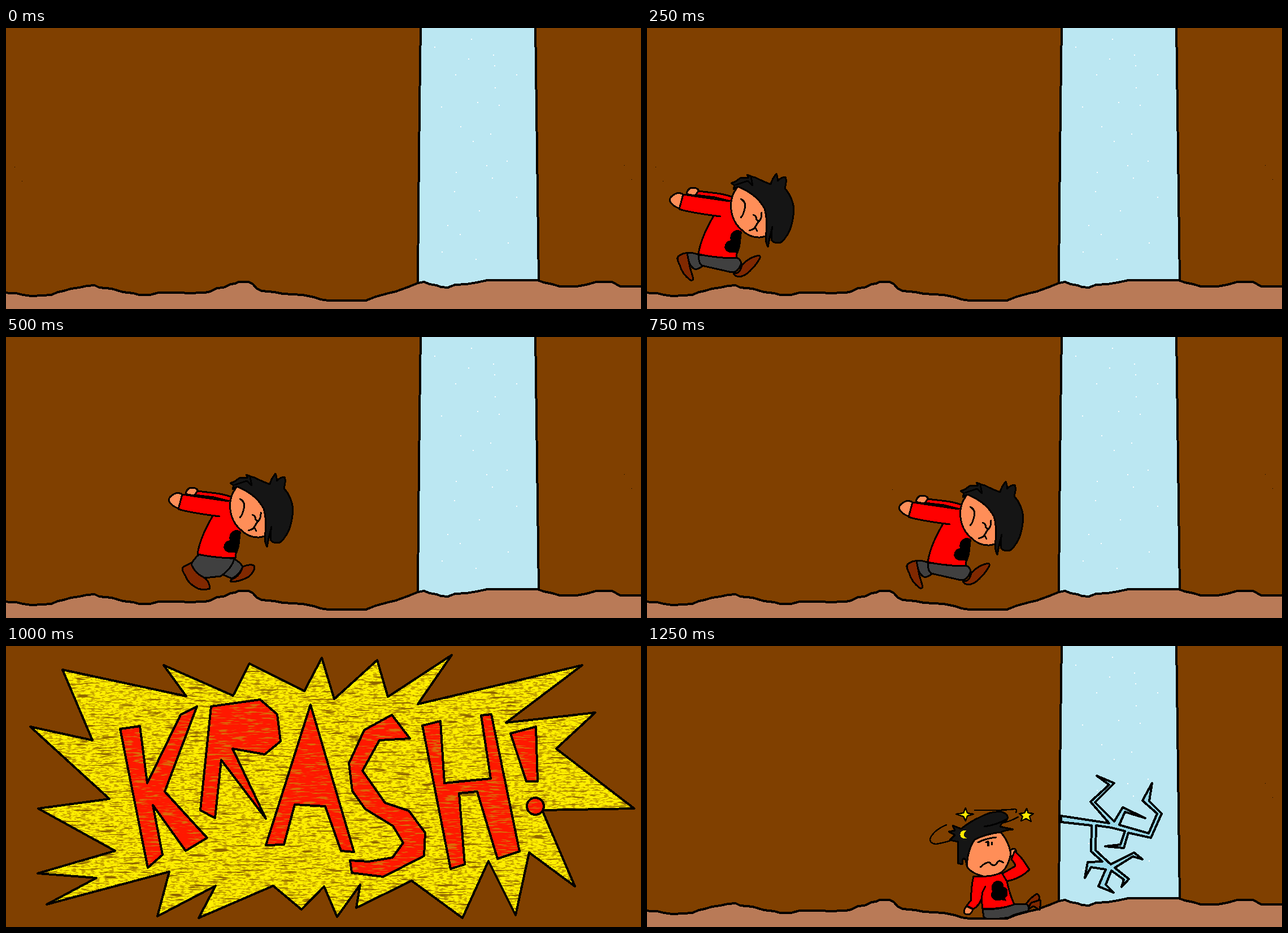
An HTML page for the animation above (1500 ms loop, 1124x498 px).

```html
<!DOCTYPE html>
<html lang="en">
<head>
<meta charset="utf-8">
<title>Krash</title>
<style>
  html, body { margin: 0; width: 100%; height: 100%; overflow: hidden; background: #804000; }
  svg { display: block; width: 100%; height: 100%; }
  .off { display: none; }
  .skin { fill: #ff8e58; }
  .red { fill: #f00; }
  .hair { fill: #151515; }
  .gray { fill: #404040; }
  .shoe { fill: #802800; }
  .gold { fill: #ffe800; }
  .line { fill: none; }
  .flat { stroke: none; }
  .ink { fill: #000; stroke: none; }
</style>
</head>
<body>
<svg viewBox="0 0 1124 498" shape-rendering="crispEdges" stroke="#000" stroke-width="3"
     stroke-linecap="round" stroke-linejoin="round">
  <defs>
    <!-- Grain plus long horizontal streaks, kept inside the painted shape -->
    <filter id="yellowTexture" filterUnits="userSpaceOnUse" x="0" y="0" width="1124" height="498" color-interpolation-filters="sRGB">
      <feTurbulence type="fractalNoise" baseFrequency=".12 .4" numOctaves="2" seed="4"/>
      <feColorMatrix values="0 0 0 0 .77  0 0 0 0 .64  0 0 0 0 0  9 0 0 0 -4.5" result="grain"/>
      <feTurbulence type="fractalNoise" baseFrequency=".025 .3" numOctaves="2" seed="9"/>
      <feColorMatrix values="0 0 0 0 .56  0 0 0 0 .4  0 0 0 0 0  0 12 0 0 -7.4" result="streaks"/>
      <feMerge result="all"><feMergeNode in="SourceGraphic"/><feMergeNode in="grain"/><feMergeNode in="streaks"/></feMerge>
      <feComposite in="all" in2="SourceAlpha" operator="in"/>
    </filter>
    <filter id="redTexture" filterUnits="userSpaceOnUse" x="0" y="0" width="1124" height="498" color-interpolation-filters="sRGB">
      <feTurbulence type="fractalNoise" baseFrequency=".04 .35" numOctaves="3" seed="6"/>
      <feColorMatrix values="0 0 0 0 .86  0 0 0 0 .42  0 0 0 0 .03  9 0 0 0 -5" result="streaks"/>
      <feMerge result="all"><feMergeNode in="SourceGraphic"/><feMergeNode in="streaks"/></feMerge>
      <feComposite in="all" in2="SourceAlpha" operator="in"/>
    </filter>
    <path id="burst" d="M100 42 319 89 279 34 402 88 431 31 528 80 559 21 581 94 657 25 676 90 789 16 729 103 1020 34 885 136 1043 118 974 182 1112 288 949 291 1007 426 926 366 902 477 854 381 808 482 718 416 620 464 627 423 586 480 563 426 523 467 473 425 341 482 371 425 268 479 289 400 72 458 160 411 56 403 193 363 57 288 183 271 43 143 153 167Z"/>
    <g id="letters">
      <path d="M202 147 237 142 250 243 309 122 338 107 281 258 356 340 318 363 260 282 277 370 251 393Z"/>
      <path d="M363 107 450 95 480 121 486 169 458 192 401 182 460 306 381 202 370 305 344 291Z"/>
      <path d="M539 104 616 365 593 363 565 284 511 281 492 352 460 353Z"/>
      <path d="M683 122 715 164 661 167 631 221 671 278 713 292 742 331 740 372 668 409 612 402 609 380 642 382 684 375 703 349 685 319 636 289 613 257 607 208 634 149Z"/>
      <path d="M737 141 769 133 776 243 858 235 841 123 859 121 909 364 870 377 834 258 802 261 812 387 787 395Z"/>
      <path d="M893 155 938 143 941 240 921 240Z"/>
      <circle cx="937" cy="284" r="15"/>
    </g>
  </defs>

  <rect class="flat" width="1124" height="498" fill="#804000"/>

  <g stroke-width="4">
    <path class="flat" fill="#bbe7f2" d="M734 0 732 140 729 470H943L940 220 937 0Z"/>
    <path class="line" d="M734-4 732 140 730 320 729 452M937-4 940 220 943 447"/>
    <path class="line" id="flakes" stroke="#fff" stroke-width="3"/>
    <path id="ground" fill="#b97a57" d="M-4 468 5 470 18 470 30 473 45 475 65 474 80 473 92 468 102 466 115 462 130 460 143 457 157 456 165 460 187 462 207 468 225 470 236 473 255 473 270 469 312 469 320 470 352 469 362 467 373 461 385 460 398 454 405 453 412 450 430 450 437 454 444 462 453 466 475 468 490 471 525 473 545 477 557 481 570 483 637 483 655 476 677 470 690 467 712 459 729 452 740 450 750 454 762 456 770 459 782 460 795 455 815 454 833 451 852 447 941 447 952 451 967 454 980 458 1010 458 1027 455 1045 450 1073 450 1087 458 1130 458V510H-4Z"/>
  </g>

  <path class="ink" d="M1094 243h1v1h-1zM1107 268h1v1h-1z"/>
  <path class="ink" id="leftSpecks" d="M15 246h1v1h-1zM28 271h1v1h-1z"/>
  <path class="ink" id="midSpeck" d="M434 270h1v1h-1z"/>

  <g id="runner">
    <g id="wideLegs">
      <path class="gray" d="M71 399Q74 424 86 428Q96 425 100 420L92 402Q80 397 71 399Z"/>
      <path class="shoe" d="M56 404Q65 398 71 399L76 424 82 444Q82 448 77 447Q62 436 58 420Q51 408 56 404Z"/>
      <path class="shoe" d="M153 435Q165 436 168 420Q180 407 197 403Q203 404 198 411Q190 425 176 436Q160 446 153 435Z"/>
      <path class="gray" d="M92 402Q90 415 97 421L150 433Q162 433 167 416Q164 408 158 407Q125 406 92 402Z"/>
    </g>
    <g id="closeLegs" transform="translate(-248 16)">
      <path class="gray" d="M404 393Q415 400 419 407Q415 420 400 428L383 421Z"/>
      <path class="shoe" d="M419 407Q435 401 440 406Q441 416 428 426Q412 434 398 434Q396 430 405 427Q416 420 419 407Z"/>
      <path class="shoe" d="M313 408 328 400Q340 420 350 426Q360 432 361 446Q350 449 340 446Q322 437 318 424Q310 412 313 408Z"/>
      <path class="gray" d="M342 385Q330 396 328 403Q335 420 352 427L380 424Q400 410 404 393Z"/>
    </g>
    <path class="skin" d="M70 294Q72 283 82 283Q93 284 92 292L86 297Q77 296 70 294Z"/>
    <path class="red" d="M91 289C110 292 135 292 154 301L148 307 120 300 86 296Z"/>
    <path class="skin" d="M63 294Q55 291 50 294Q40 299 40 306Q43 314 57 320Q64 310 63 294Z"/>
    <path class="red flat" d="M64 295 147 307 156 315 168 360 158 408 91 401Q95 372 118 332L58 322Z"/>
    <path class="line" d="M146 307 64 295 57 321Q75 327 130 334M118 333Q95 372 91 401Q125 408 158 408Q160 390 166 362"/>
    <path class="ink" d="M150 363Q160 354 168 361L165 388 161 400 155 398Q140 400 137 389Q138 378 148 376Q146 370 150 363Z"/>
    <path class="skin" d="M162 280Q146 298 149 322Q152 345 168 358Q182 372 200 371L211 369Q213 340 210 322Q200 300 162 280Z"/>
    <path class="hair" d="M161 281 153 286 155 279 149 275 157 272 165 266 180 265 177 260Q187 264 192 265Q205 272 219 277Q221 268 229 258Q232 265 231 271Q238 264 245 264Q248 272 244 284Q258 300 260 321Q258 355 246 370Q240 381 232 381Q225 381 221 377Q219 365 222 352Q217 370 214 388Q208 375 211 362Q213 335 208 320Q195 295 161 281Z"/>
    <path class="line" d="M157 278 178 271 187 279 184 264M166 303Q176 308 173 320Q170 333 166 336M188 331Q194 333 194 340L199 343M203 327Q204 338 196 345Q194 349 190 355M181 359Q186 358 192 354L195 360"/>
  </g>

  <g id="dazed">
    <path fill="#99d9ea" stroke-width="4" d="M733 301 818 314 785 276 818 246 796 230 827 243 793 277 827 311 842 286 882 305 846 294 836 317 888 332 903 297 877 274 894 243 889 275 911 297 892 340 852 331 844 358 811 355 838 352 846 328 822 322 795 318 794 362 821 387 862 366 877 378 860 373 828 393 853 413 840 427 844 414 822 398 812 423 826 437 799 426 812 396 786 392 775 411 780 383 806 382 786 364 787 318 733 312Z"/>
    <path class="line" stroke-width="2.5" d="M580 291Q625 292 652 289Q656 291 653 295M657 303Q640 312 628 314M530 317Q510 325 502 339Q498 350 512 351Q535 347 550 340"/>
    <path class="shoe" d="M670 458Q680 445 690 439Q698 443 692 453L680 462Z"/>
    <path class="shoe" d="M673 468 680 455 696 450Q697 458 695 468L684 461Z"/>
    <path class="gray" d="M594 467Q630 467 650 457L673 458Q678 465 674 470Q650 475 640 481Q600 487 596 480Z"/>
    <path class="skin" d="M566 461Q560 466 562 474Q572 480 577 467Z"/>
    <path class="skin" d="M642 374Q640 360 650 359Q655 362 653 369Z"/>
    <path class="red" d="M651 363 664 377 677 396Q662 412 637 417L626 405 652 390Q652 386 645 378Z"/>
    <path class="red" d="M578 408Q600 411 628 402L637 417Q642 440 650 458Q630 466 594 466L592 448Q588 460 578 466L566 460 574 450Q573 430 578 408Z"/>
    <path class="line" d="M592 448 594 436 599 426M594 466 592 448"/>
    <path class="ink" d="M613 420Q618 414 626 417Q632 420 631 427Q639 428 638 436Q640 443 634 446L636 452 627 450Q618 454 611 447Q607 441 611 435Q607 426 613 420Z"/>
    <path class="skin" d="M567 370Q566 350 580 340Q605 330 626 330Q640 345 644 368Q640 390 628 401Q612 409 595 408Q572 402 566 390Z"/>
    <path class="hair" d="M566 389 564 379Q558 372 558 387L550 385 551 347 536 344 545 335 534 329 545 327 541 318 556 324Q570 312 590 303Q610 292 628 294Q640 298 638 306Q636 312 628 314L625 320 648 325Q635 326 626 330Q600 333 580 343Q568 360 566 389Z"/>
    <path class="line" d="M597 320Q620 317 638 306M586 348Q600 341 618 339M590 392Q600 382 607 384Q612 392 619 386Q622 377 631 384M600 348 604 346"/>
    <path class="ink" d="M602 347h4v8h-4zM609 347h3v6h-3z"/>
    <path class="gold flat" d="M566 327Q556 325 554 334Q556 343 568 341Q561 340 561 334Q562 329 566 327Z"/>
    <path class="gold" stroke-width="2.5" d="M564 287 567 296 578 298 567 301 564 310 560 302 547 298 560 296ZM672 288 675 296 684 297 677 302 680 311 671 306 662 310 665 302 659 297 668 296Z"/>
  </g>

  <g id="crash">
    <rect class="flat" width="1124" height="498" fill="#804000"/>
    <use href="#burst" stroke="none" fill="#fff000" filter="url(#yellowTexture)"/>
    <use href="#burst" fill="none" stroke-width="4"/>
    <use href="#letters" stroke="none" fill="#ff1800" filter="url(#redTexture)"/>
    <use href="#letters" fill="none" stroke-width="4"/>
  </g>
</svg>
<script>
  const el = id => document.getElementById(id);
  const show = (id, on) => el(id).classList.toggle('off', !on);

  const flakes = [
    [824, 20], [759, 34], [819, 55], [863, 48], [865, 67], [904, 83], [796, 83],
    [866, 106], [835, 132], [873, 137], [771, 140], [805, 175], [858, 188],
    [827, 201], [887, 236], [851, 244], [797, 256], [861, 266], [794, 290],
    [904, 300], [838, 324], [782, 350], [804, 366], [889, 381], [772, 397], [832, 410]
  ];
  el('flakes').setAttribute('d', flakes.map(p => `M${p}h.01`).join(''));

  // Runner offset for each step that shows him
  const stride = { 1: [0, 0], 2: [248, -16], 3: [406, -2] };

  let last = -1;
  function draw(now) {
    const step = Math.floor(now % 1500 / 250);
    if (step !== last) {
      last = step;
      const at = stride[step];
      show('runner', at);
      if (at) el('runner').setAttribute('transform', `translate(${at})`);
      show('wideLegs', step !== 2);
      show('closeLegs', step === 2);
      show('leftSpecks', step < 2);
      show('midSpeck', step === 3);
      show('crash', step === 4);
      show('dazed', step === 5);
    }
    requestAnimationFrame(draw);
  }
  draw(performance.now());
</script>
</body>
</html>
```
